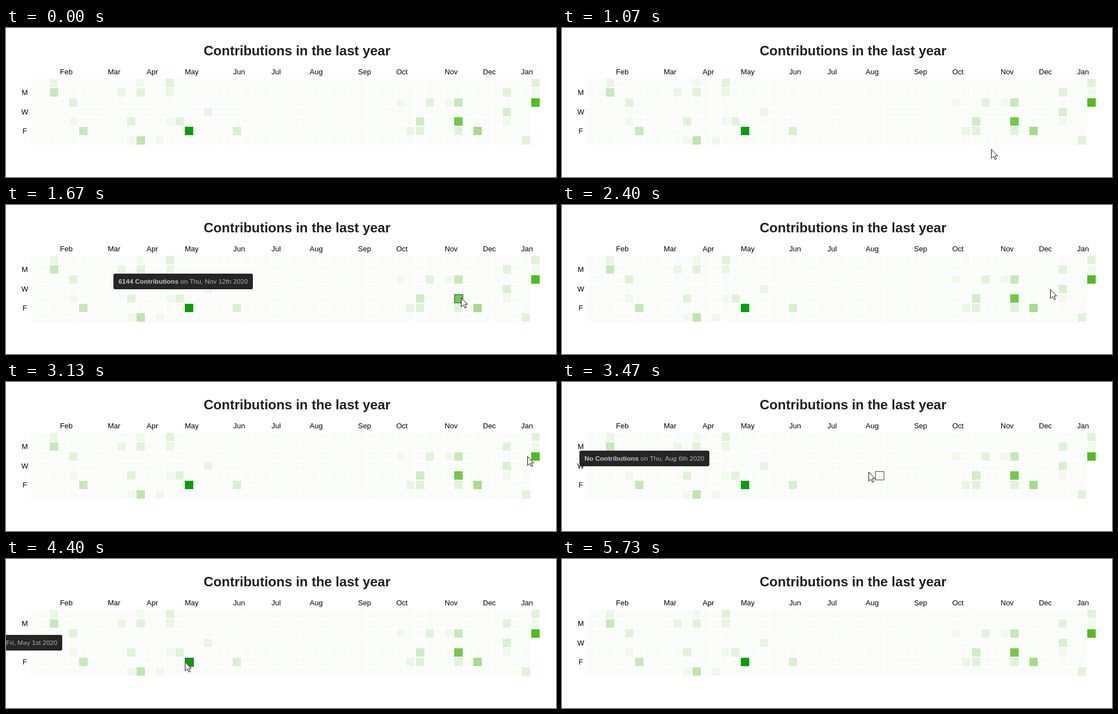
Animation of 978 by 267 pixels, one loop 6070 ms. Source, as an HTML page with a canvas:

```html
<!DOCTYPE html>
<html lang="en">
<head>
<meta charset="utf-8">
<title>Contributions</title>
<style>
html, body { margin: 0; width: 100%; height: 100%; overflow: hidden; background: #fff; }
canvas { display: block; }
</style>
</head>
<body>
<canvas id="stage" width="978" height="267"></canvas>
<script>
const ctx = document.getElementById('stage').getContext('2d');
const FONT = '"Liberation Sans", Arial, sans-serif';
const LOOP = 6070, STEP = 1000 / 15;
const PITCH = 17.115, SIZE = 15, LEFT = 44, TOP = 91.3;
const MONTHS = 'Jan Feb Mar Apr May Jun Jul Aug Sep Oct Nov Dec'.split(' ');
const DAYS = 'Sun Mon Tue Wed Thu Fri Sat'.split(' ');

const colX = c => Math.round(LEFT + c * PITCH);
const rowY = r => Math.round(TOP + r * PITCH);
const dateOf = (c, r) => new Date(2020, 0, 5 + c * 7 + r);
const weeksIn = r => r < 3 ? 53 : 52;

// Busy days, one line per weekday, as "week:level"
const levels = [
  '2:2 11:1 14:3 52:3',
  '2:6 9:2 11:3 14:2 49:3 52:1',
  '4:3 38:1 41:3 43:1 44:6 52:20',
  '18:2 49:4',
  '4:1 10:3 14:1 15:3 40:5 44:16 49:1',
  '5:6 16:29 21:4 39:2 40:3 44:3 46:10',
  '10:1 11:7 13:1 51:3'
].map(line => Object.fromEntries(line.split(' ').map(p => p.split(':'))));
const levelOf = (c, r) => levels[r][c] || 0;

function shade(level) {
  const k = level / 20;
  return `rgb(${250 - 172 * k}, ${252 - 62 * k}, ${249 - 221 * k})`;
}

// Pointer moves; it rests between them
const easeIn = p => p * p;
const easeOut = p => Math.sin(p * Math.PI / 2);
const moves = [
  { from: 13, to: 21, x: 779, y: 184, ease: easeOut },
  { from: 21, to: 25, x: 809, y: 166, ease: easeOut },
  { from: 33, to: 43, x: 938, y: 132, ease: easeOut },
  { from: 46, to: 52, x: 545, y: 161, ease: easeIn },
  { from: 52, to: 61, x: 327, y: 193, ease: easeOut },
  { from: 63, to: 66, x: 318, y: 184, ease: easeOut },
  { from: 79, to: 86, x: 322, y: 267, ease: easeIn }
];

function pointerAt(tick) {
  let x = 742, y = 258;
  for (const m of moves) {
    const k = m.ease(Math.min(1, Math.max(0, (tick - m.from) / (m.to - m.from))));
    x += (m.x - x) * k;
    y += (m.y - y) * k;
  }
  return [x, y];
}

// The cell just under the pointer, unless it is in mid-move
function hoverAt(tick) {
  if (moves.some(m => tick > m.from && tick < m.to)) return null;
  const [x, y] = pointerAt(tick - .12);
  const u = (x - LEFT) / PITCH, v = (y - TOP) / PITCH;
  const c = Math.floor(u), r = Math.floor(v), edge = 10 / 12;
  const inside = r >= 0 && r < 7 && c >= 0 && c < weeksIn(r) && u - c < edge && v - r < edge;
  return inside ? [c, r] : null;
}

function text(str, x, y, size, color, weight = '', align = 'left') {
  ctx.font = `${weight} ${size}px ${FONT}`;
  ctx.textAlign = align;
  ctx.fillStyle = color;
  ctx.fillText(str, x, y);
}

function widthOf(str, size, weight = '') {
  ctx.font = `${weight} ${size}px ${FONT}`;
  return ctx.measureText(str).width;
}

function drawCalendar() {
  text('Contributions in the last year', 517.5, 49, 24, '#1f1f1f', 'bold', 'center');
  for (let r = 0; r < 7; r++) {
    if (r % 2) text(DAYS[r][0], 33.5, rowY(r) + 12, 13, '#000', '', 'center');
    for (let c = 0; c < weeksIn(r); c++) {
      ctx.fillStyle = shade(levelOf(c, r));
      ctx.fillRect(colX(c), rowY(r), SIZE, SIZE);
    }
  }
  // A month is named above the week that holds its first day
  for (let c = 0; c < 52; c++) {
    const saturday = dateOf(c, 6);
    if (saturday.getDate() <= 7)
      text(MONTHS[saturday.getMonth()], Math.round(44.7 + c * 17.09), 83, 13, '#000');
  }
}

function dateLabel(c, r) {
  const d = dateOf(c, r), n = d.getDate();
  const suffix = n > 10 && n < 14 ? 'th' : ['th', 'st', 'nd', 'rd'][n % 10] || 'th';
  return ` on ${DAYS[r]}, ${MONTHS[d.getMonth()]} ${n}${suffix} ${d.getFullYear()}`;
}

function drawHover([c, r]) {
  ctx.strokeStyle = '#444';
  ctx.lineWidth = 1;
  ctx.strokeRect(colX(c) + .5, rowY(r) + .5, SIZE, SIZE);

  const size = 11.8, pad = 9;
  const head = (levelOf(c, r) ** 2 * 24 || 'No') + ' Contributions', tail = dateLabel(c, r);
  const headW = widthOf(head, size, 'bold');
  const width = Math.round(headW + widthOf(tail, size) + 2 * pad);
  const x = Math.round(146.5 + (c - 30) * 12 - width / 2), y = 123 + (r - 4) * 13;
  ctx.fillStyle = 'rgba(0,0,0,.85)';
  ctx.beginPath();
  ctx.roundRect(x, y, width, 28, 3);
  ctx.fill();
  text(head, x + pad, y + 18, size, '#c4c4c4', 'bold');
  text(tail, x + pad + headW, y + 18, size, '#b0b0b0');
}

function drawPointer([x, y]) {
  ctx.save();
  ctx.translate(Math.round(x) + .5, Math.round(y) + .5);
  ctx.beginPath();
  [[0, 0], [0, 16], [4, 12.5], [6.5, 18], [9, 17], [6.5, 11.5], [11, 11.5]]
    .forEach(p => ctx.lineTo(...p));
  ctx.closePath();
  ctx.fillStyle = '#fff';
  ctx.fill();
  ctx.strokeStyle = '#111';
  ctx.lineWidth = 1;
  ctx.stroke();
  ctx.restore();
}

function frame(now) {
  const tick = Math.floor((now % LOOP + 4) / STEP);
  ctx.fillStyle = '#fff';
  ctx.fillRect(0, 0, 978, 267);
  drawCalendar();
  if (tick < 2) drawPointer([977 - tick, 266]);
  if (tick < 13 || tick > 85) return;
  const cell = hoverAt(tick);
  if (cell) drawHover(cell);
  drawPointer(pointerAt(tick));
}

const start = performance.now();
function loop() {
  frame(performance.now() - start);
  requestAnimationFrame(loop);
}
loop();
</script>
</body>
</html>
```
